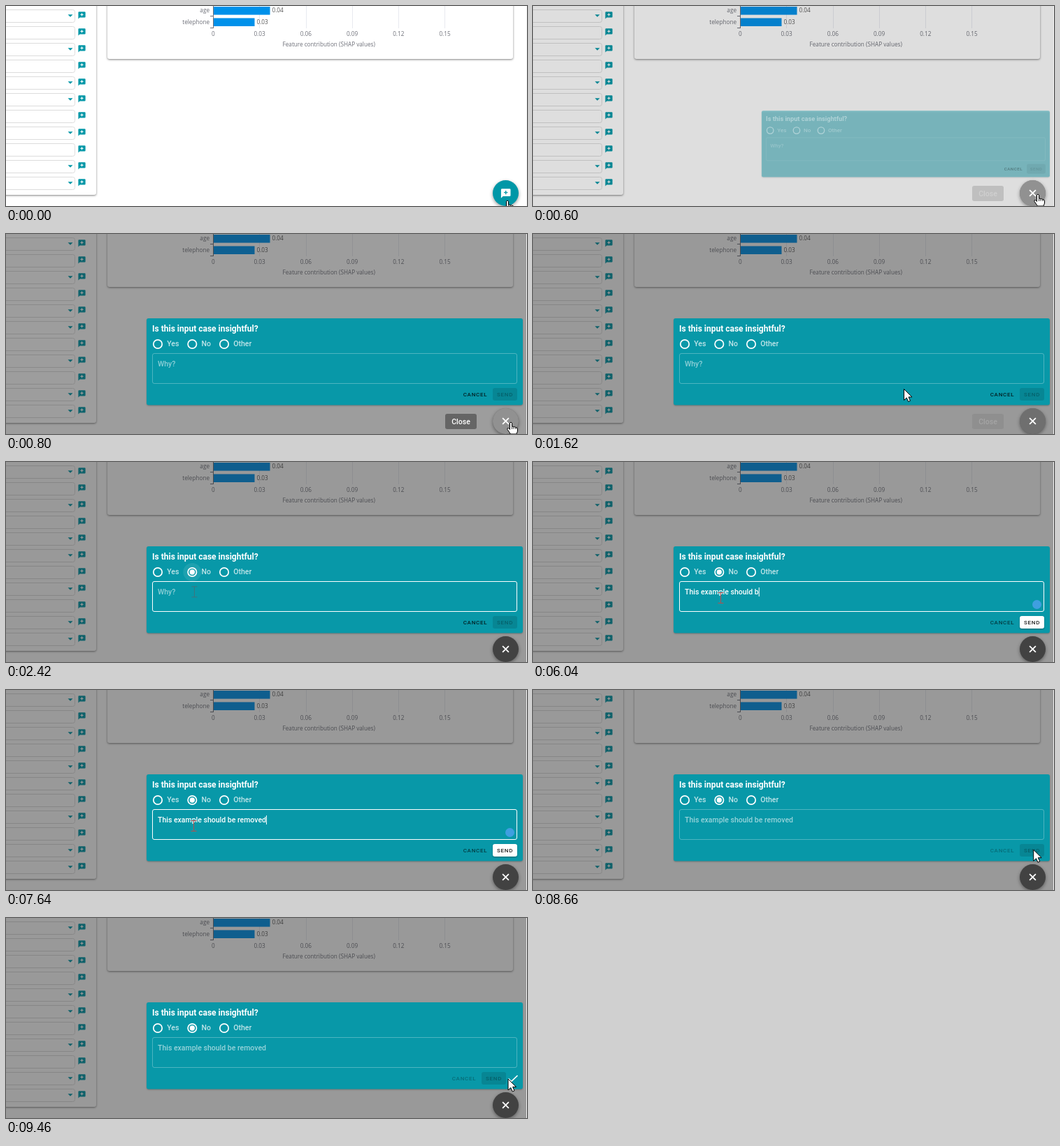
Write an HTML page with a canvas that moves like this. It is 745 by 287 pixels and loops after 9.66 s.

```html
<!DOCTYPE html>
<html lang="en">
<head>
<meta charset="utf-8">
<title>Feedback form</title>
<style>
html, body { margin: 0; width: 100%; height: 100%; overflow: hidden; background: #fff; }
canvas { display: block; }
</style>
</head>
<body>
<canvas id="stage" width="745" height="287"></canvas>
<script>
const ctx = document.getElementById('stage').getContext('2d');
const LOOP = 9660, STEPS = 48;
const TEAL = '#0097a7', PANEL = '#0898a8', BLUE = '#0091ea';
const MESSAGE = 'Is this input case insightful?';
const ANSWER = 'This example should be removed';
const CHART_FONT = '8.2px "Open Sans", sans-serif';
const BODY_FONT = '500 10.5px Roboto, sans-serif';
const OPENED = 500, PICKED = 2000, FOCUSED = 2400, SENT = 8400, CONFIRMED = 8860;

const BUBBLE = new Path2D('M-8-10H8Q10-10 10-8V4Q10 6 8 6H-6L-10 10V-8Q-10-10-8-10Z');
const PLUS = new Path2D('M-1-6H1V-3H4V-1H1V2H-1V-1H-4V-3H-1Z');
const HAND = new Path2D('M-1.5 1.2Q0-1 1.5 1.2V6.5Q3 5.5 4 7Q6 6 7 7.8Q9.5 7.5 9.5 10V13L8 17H-.5L-5 10.5Q-5.5 8-3.5 8.5L-1.5 10.5Z');
const ARROW = new Path2D('M0 0V16L3.8 12.5 6.2 18 9 16.8 6.6 11.4H11.5Z');

// [time, value, ...] keys
const TYPING = [[3200, 0], [3620, 4], [4020, 8], [4840, 14], [6040, 21], [7240, 30]];
const POINTER = [[0, 717, 279], [400, 722, 270], [1400, 722, 270], [1900, 266, 157], [2100, 266, 157],
  [2400, 269, 186], [2800, 268, 195], [7700, 268, 195], [8240, 714, 228], [8500, 714, 228], [8860, 718, 231]];

const clamp = v => Math.max(0, Math.min(1, v));
const ramp = (t, from, to) => clamp((t - from) / (to - from));
const white = a => `rgba(255,255,255,${a})`;
const black = a => `rgba(0,0,0,${a})`;

function track(keys, t, i) {
  const next = keys.findIndex(k => k[0] > t);
  if (next < 0) return keys[keys.length - 1][i];
  if (next === 0) return keys[0][i];
  const a = keys[next - 1], b = keys[next];
  return a[i] + (b[i] - a[i]) * ramp(t, a[0], b[0]);
}

function text(str, x, y, font, color, align = 'left', spacing = 0) {
  ctx.font = font;
  ctx.fillStyle = color;
  ctx.textAlign = align;
  ctx.letterSpacing = spacing + 'px';
  ctx.fillText(str, x, y);
}

function rect(x, y, w, h, color) {
  ctx.fillStyle = color;
  ctx.fillRect(x, y, w, h);
}

function box(x, y, w, h, r, fill, stroke) {
  ctx.beginPath();
  ctx.roundRect(x, y, w, h, r);
  if (fill) { ctx.fillStyle = fill; ctx.fill(); }
  if (stroke) { ctx.strokeStyle = stroke; ctx.lineWidth = 1; ctx.stroke(); }
}

function disc(x, y, r, fill) {
  ctx.beginPath();
  ctx.arc(x, y, r, 0, 7);
  ctx.fillStyle = fill;
  ctx.fill();
}

function line(points, color, width) {
  ctx.beginPath();
  points.forEach(p => ctx.lineTo(...p));
  ctx.strokeStyle = color;
  ctx.lineWidth = width;
  ctx.stroke();
}

function shadowed(blur, dy, alpha, draw) {
  ctx.save();
  ctx.shadowColor = black(alpha);
  ctx.shadowBlur = blur;
  ctx.shadowOffsetY = dy;
  draw();
  ctx.restore();
}

function bubble(x, y, scale, color, plus) {
  ctx.save();
  ctx.translate(x, y);
  ctx.scale(scale, scale);
  ctx.fillStyle = color;
  ctx.fill(BUBBLE);
  ctx.fillStyle = plus;
  ctx.fill(PLUS);
  ctx.restore();
}

function drawForm() {
  shadowed(3, 1, .5, () => box(-10, -10, 139, 281, 3, '#fff'));
  for (let i = 0; i < 11; i++) {
    const y = 14 + 24 * i;
    box(-10, y - 8.5, 108.5, 18, 3, null, '#dcdcdc');
    if (![1, 3, 6, 8].includes(i)) {
      ctx.fillStyle = TEAL;
      ctx.fill(new Path2D(`M88.5 ${y - 1.8}h7l-3.5 3.6z`));
    }
    bubble(108.5, y - .6, .51, TEAL, '#fff');
  }
}

function drawChart() {
  const ink = '#6e7079';
  shadowed(3, 1, .5, () => box(145, -10, 580, 86, 3, '#fff'));
  for (let i = 0; i < 6; i++) {
    const x = 296 + 66.25 * i;
    if (i) rect(Math.round(x), 0, 1, 32, '#e8eaf0');
    text(i ? (i * .03).toFixed(2) : '0', x + .3, 43, CHART_FONT, ink, 'center');
  }
  [['age', 1, 81, '0.04', 9], ['telephone', 17.4, 59, '0.03', 25.7]].forEach(([name, y, w, value, base]) => {
    rect(296.5, y, w, 11.6, BLUE);
    text(name, 291, base, CHART_FONT, ink, 'right');
    text(value, 299.5 + w, base, CHART_FONT, '#555', 'left');
  });
  rect(296, 0, 1, 32, ink);
  rect(292, 14, 4, 1, ink);
  rect(292, 31, 4, 1, ink);
  text('Feature contribution (SHAP values)', 461.7, 58, CHART_FONT, ink, 'center');
}

function drawRadio(x, label, chosen) {
  ctx.beginPath();
  ctx.arc(x, 158, 6.2, 0, 7);
  ctx.strokeStyle = '#fff';
  ctx.lineWidth = 1.7;
  ctx.stroke();
  if (chosen) disc(x, 158, 3.7, '#fff');
  text(label, x + 13.2, 161.3, BODY_FONT, white(.75));
}

function drawField(t, typed) {
  const focused = t >= FOCUSED && t < SENT;
  box(209.5, 171.5, 521, 43, 2.5, null, focused ? '#fff' : white(.28));
  const content = typed || 'Why?';
  text(content, 217, 190, BODY_FONT, white(t >= SENT ? .58 : typed ? 1 : .55));
  if (!focused) return;
  const typing = t >= TYPING[0][0] && t < 7240;
  const caretOn = typing || (t > 2600 && (t + 180) % 1060 < 530);
  if (caretOn) rect(217 + (typed ? ctx.measureText(typed).width : 0), 180, 1, 13, '#fff');
  if (typed) disc(720.5, 204.5, 6.5, '#3f9fe0');
}

function drawButtons(t, ready) {
  const font = '500 8px Roboto, sans-serif';
  const shift = t >= CONFIRMED ? -16 : 0;
  const cancel = t >= SENT ? .28 : ready ? .6 : .78;
  text('CANCEL', 653.7 + shift, 233, font, black(cancel), 'left', .7);
  const drawSend = () => box(696 + shift, 221, 35, 18, 3, ready ? '#fff' : black(.12));
  if (ready) shadowed(2, 1, .35, drawSend); else drawSend();
  text('SEND', 702 + shift, 233, font, black(ready ? .87 : .28), 'left', .7);
  if (shift) line([[718.5, 230.5], [722.5, 234.5], [731.5, 226]], '#fff', 1.7);
}

function drawPanel(t) {
  const shown = ramp(t, OPENED, OPENED + 250);
  if (!shown) return;
  ctx.save();
  ctx.globalAlpha = shown;
  ctx.translate(739, 246);
  ctx.scale(.6 + .4 * shown, .6 + .4 * shown);
  ctx.translate(-739, -246);
  shadowed(2, 1, .25, () => box(201, 121, 538, 124.4, 3, PANEL));
  text(MESSAGE, 209, 140, '700 12px Roboto, sans-serif', '#fff');
  const ripple = ramp(t, PICKED, PICKED + 150) * (1 - ramp(t, 2350, 2600));
  if (ripple) disc(266.3, 158, 13, white(.12 * ripple));
  drawRadio(217, 'Yes');
  drawRadio(266.3, 'No', t >= PICKED);
  drawRadio(312, 'Other');
  const typed = ANSWER.slice(0, Math.floor(track(TYPING, t, 1) + .3));
  drawField(t, typed);
  drawButtons(t, typed && t < SENT);
  ctx.restore();
}

function drawFab(t) {
  const open = t >= OPENED;
  shadowed(5, 2, .4, () => disc(714.5, 268.5, 18.5, open ? '#424242' : TEAL));
  if (!open) return bubble(714.7, 269, .68, '#fff', TEAL);
  const glow = t < PICKED ? .42 - .18 * ramp(t, 850, 1150) : 0;
  disc(714.5, 268.5, 18.5, white(glow));
  line([[710.1, 264.1], [718.9, 272.9]], '#fff', 1.8);
  line([[718.9, 264.1], [710.1, 272.9]], '#fff', 1.8);
  ctx.globalAlpha = ramp(t, 550, 750) * (1 - ramp(t, 1450, 1650));
  box(628, 258, 45, 22, 3, 'rgba(97,97,97,.92)');
  text('Close', 650.5, 272.5, BODY_FONT, '#fff', 'center');
  ctx.globalAlpha = 1;
}

function drawPointer(t) {
  const x = track(POINTER, t, 1), y = track(POINTER, t, 2);
  const inField = t > 2200 && t < SENT && x < 731 && y > 171 && y < 215;
  if (inField) {
    const color = t < 2600 ? 'rgba(120,80,85,.5)' : '#b4504e';
    line([[x + .5, y - 7], [x + .5, y + 7]], color, 1);
    [-7.5, 7.5].forEach(d => line([[x - 3.5, y + d], [x + 4.5, y + d]], color, 1));
    return;
  }
  const overButton = t < SENT && (x > 696 || Math.abs(x - 266) < 20);
  const shape = overButton ? HAND : ARROW;
  ctx.save();
  ctx.translate(x, y);
  ctx.lineJoin = 'round';
  ctx.fillStyle = '#fff';
  ctx.fill(shape);
  ctx.strokeStyle = '#000';
  ctx.lineWidth = 1;
  ctx.stroke(shape);
  if (overButton) [1.5, 4, 6.8].forEach(d => line([[d, 7], [d, 10]], '#000', .8));
  ctx.restore();
}

function draw(t) {
  rect(0, 0, 745, 287, '#fff');
  drawForm();
  drawChart();
  rect(0, 0, 744, 287, `rgba(33,33,33,${.46 * ramp(t, OPENED, OPENED + 320)})`);
  rect(744, 0, 1, 287, '#f0f0f0');
  drawPanel(t);
  drawFab(t);
  drawPointer(t);
}

const start = performance.now();
function tick() {
  const t = (performance.now() - start) % LOOP;
  const step = Math.floor(t / LOOP * STEPS + .1) % STEPS;
  draw(step * LOOP / STEPS);
  requestAnimationFrame(tick);
}
tick();
</script>
</body>
</html>
```
